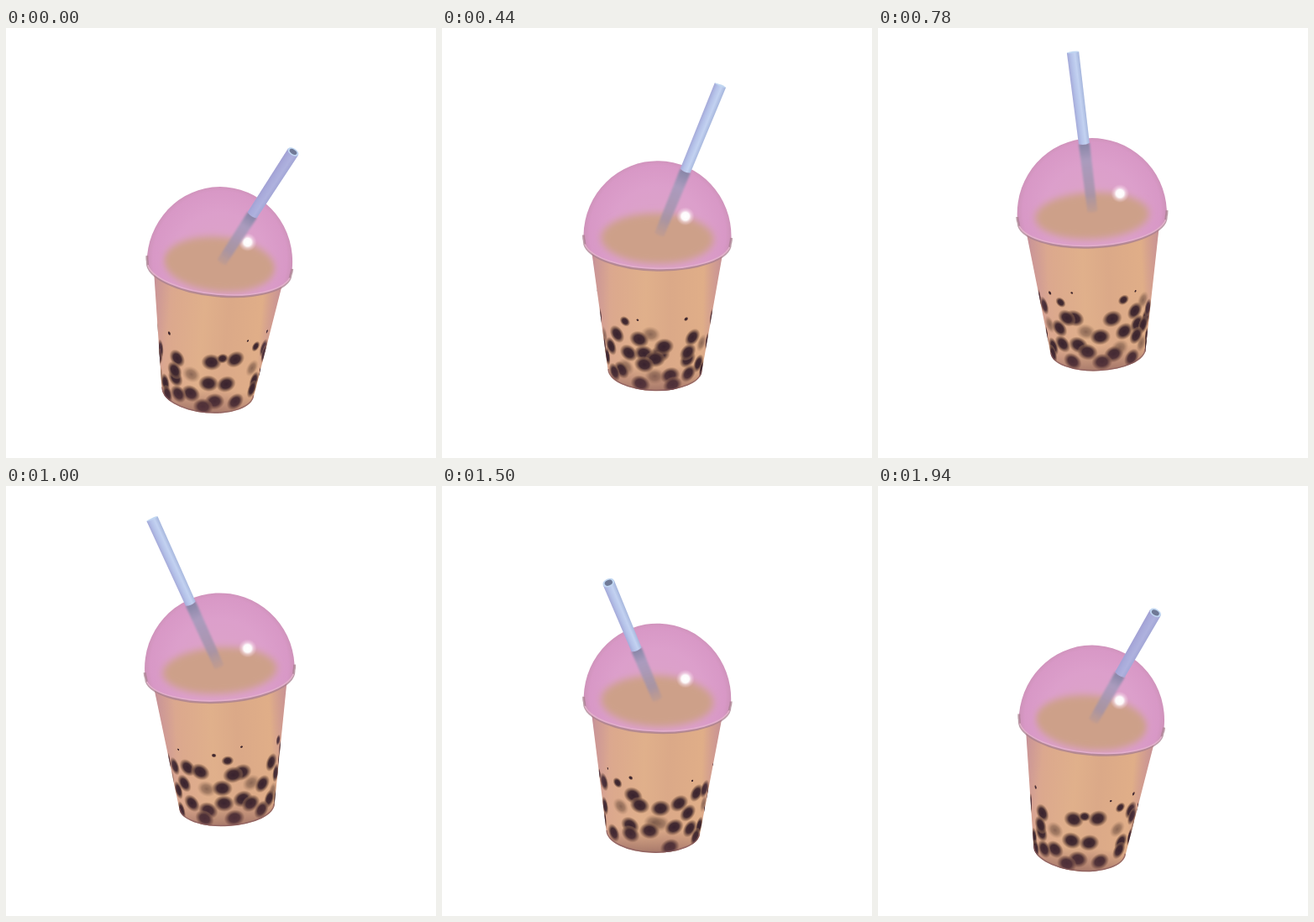
An HTML page for the animation above (2000 ms loop, 512 px wide and 512 px high).

```html
<!DOCTYPE html>
<html lang="en">
<head>
<meta charset="utf-8">
<title>Bubble tea</title>
<style>
html, body { margin: 0; width: 100%; height: 100%; overflow: hidden; background: #fff; }
svg { display: block; width: 100vw; height: 100vh; }
</style>
</head>
<body>
<svg viewBox="0 0 512 512">
  <defs>
    <linearGradient id="tea">
      <stop offset="0" stop-color="#c4919a"/>
      <stop offset=".05" stop-color="#d8a394"/>
      <stop offset=".2" stop-color="#dca98d"/>
      <stop offset=".42" stop-color="#e0b08b"/>
      <stop offset=".6" stop-color="#dba988"/>
      <stop offset=".85" stop-color="#e0ae88"/>
      <stop offset=".96" stop-color="#d8a28f"/>
      <stop offset="1" stop-color="#c4919c"/>
    </linearGradient>
    <linearGradient id="sides">
      <stop offset="0" stop-color="#b5809a" stop-opacity=".5"/>
      <stop offset=".16" stop-color="#b5809a" stop-opacity="0"/>
      <stop offset=".84" stop-color="#b5809a" stop-opacity="0"/>
      <stop offset="1" stop-color="#b5809a" stop-opacity=".5"/>
    </linearGradient>
    <linearGradient id="floor" x2="0" y2="1">
      <stop offset=".84" stop-color="#7a4a50" stop-opacity="0"/>
      <stop offset="1" stop-color="#6e4248" stop-opacity=".5"/>
    </linearGradient>
    <radialGradient id="lid" gradientUnits="userSpaceOnUse" cx="0" cy="-4" r="92">
      <stop offset="0" stop-color="#dca4c8"/>
      <stop offset=".6" stop-color="#dc9fcb"/>
      <stop offset=".88" stop-color="#d898c6"/>
      <stop offset=".96" stop-color="#cd92b8"/>
      <stop offset="1" stop-color="#c08ba8"/>
    </radialGradient>
    <radialGradient id="dark">
      <stop offset="0" stop-color="#38222e"/>
      <stop offset=".5" stop-color="#40282f" stop-opacity=".97"/>
      <stop offset=".68" stop-color="#66473f" stop-opacity=".78"/>
      <stop offset=".85" stop-color="#8c6650" stop-opacity=".5"/>
      <stop offset="1" stop-color="#a67b60" stop-opacity="0"/>
    </radialGradient>
    <radialGradient id="deep">
      <stop offset="0" stop-color="#6e4e42" stop-opacity=".75"/>
      <stop offset=".5" stop-color="#83604d" stop-opacity=".62"/>
      <stop offset="1" stop-color="#a67b60" stop-opacity="0"/>
    </radialGradient>
    <radialGradient id="glint">
      <stop offset="0" stop-color="#fff"/>
      <stop offset=".42" stop-color="#fff" stop-opacity=".95"/>
      <stop offset=".65" stop-color="#fff0f8" stop-opacity=".45"/>
      <stop offset="1" stop-color="#fbdcec" stop-opacity="0"/>
    </radialGradient>
    <linearGradient id="tube">
      <stop offset="0" stop-color="#a4a8d8"/>
      <stop offset=".3" stop-color="#b4c1e8"/>
      <stop offset=".65" stop-color="#c3d2f1"/>
      <stop offset="1" stop-color="#a5b5dc"/>
    </linearGradient>
    <linearGradient id="sunk" x1="0" y1="1" x2="0" y2="0">
      <stop offset="0" stop-color="#a5929f" stop-opacity=".25"/>
      <stop offset=".25" stop-color="#a091a8" stop-opacity=".8"/>
      <stop offset=".75" stop-color="#a59bbc" stop-opacity=".9"/>
      <stop offset="1" stop-color="#8685a6"/>
    </linearGradient>
    <filter id="soft" x="-20%" y="-30%" width="140%" height="160%"><feGaussianBlur stdDeviation="4"/></filter>
    <filter id="haze" x="-30%" y="-10%" width="160%" height="120%"><feGaussianBlur stdDeviation="1.1"/></filter>
    <clipPath id="inside"><path class="wall"/></clipPath>
    <clipPath id="under"><path class="cap"/></clipPath>
  </defs>

  <g id="cup">
    <path class="wall" fill="url(#tea)"/>
    <g clip-path="url(#inside)">
      <g id="pearls"></g>
      <path class="wall" fill="url(#floor)"/>
      <path class="wall" fill="url(#sides)"/>
      <path id="base" fill="none" stroke="#875a60" stroke-width="3" opacity=".7"/>
    </g>
    <path class="cap" fill="url(#lid)"/>
    <g clip-path="url(#under)">
      <ellipse id="surface" fill="#cda089" filter="url(#soft)"/>
    </g>
    <path d="M-88 0Q-88 4 -87 7A87 33 0 0 0 87 7Q88 4 88 0" fill="none" stroke="#a97f8f" stroke-width="3" opacity=".75"/>
    <path d="M-86 11A87 32 0 0 0 86 11" fill="none" stroke="#e3b0cc" stroke-width="1.6"/>
  </g>
  <circle id="spark" r="11" fill="url(#glint)"/>
  <g id="straw">
    <path id="lower" fill="url(#sunk)" filter="url(#haze)"/>
    <path class="upper" fill="url(#tube)"/>
    <path class="upper" id="shade" fill="#a29cd2"/>
    <ellipse id="lip" rx="7.2" fill="#c0d6f1"/>
    <ellipse id="hole" rx="4.8" fill="#6f7996"/>
  </g>
</svg>
<script>
const FPS = 18, STEPS = 36, RAD = Math.PI / 180;
const $ = id => document.getElementById(id);
const set = (el, attrs) => { for (const k in attrs) el.setAttribute(k, attrs[k]); };
const setAll = (cls, d) => document.querySelectorAll(cls).forEach(el => set(el, { d }));

// Pearls as [angle around the cup, height from floor to rim]
const groups = [
  { r: 12, fill: 'deep', at: [[52, .33], [-85, .46], [-80, .12], [-152, .31], [159, .29], [97, .24], [90, .25], [-115, .16], [-20, .3]] },
  { r: 12.5, fill: 'dark', at: [
    [-38, .39], [1, .43], [26, .45], [-41, .22], [-42, .28], [-20, .14], [0, .25], [20, .245], [9, .1], [-37, .1],
    [-4, .05], [36, .08], [63, .2], [-75, .3], [68, .45], [-62, .12], [-97, .41], [-71, .36], [-110, .28], [-92, .3],
    [-80, .26], [-92, .21], [-97, .05], [-124, .4], [-122, .12], [-137, .27], [-58, .04], [-163, .41], [-172, .4], [-184, .3],
    [-183, .18], [-162, .2], [-152, .15], [-136, .07], [-172, .06], [117, .39], [139, .43], [154, .42], [130, .29], [114, .2],
    [137, .15], [158, .12], [97, .365], [75, .38], [63, .13], [86, .18], [111, .04], [152, .05]] },
  { r: 7.5, fill: 'dark', at: [[12, .465], [50, .515], [-112, .53], [-177, .515]] },
  { r: 3.2, fill: 'dark', at: [[-49, .56], [66, .59], [-190, .56]] },
  { r: 2, fill: 'dark', at: [[37, .59], [-98, .565], [-163, .61], [130, .55]] }
];

const pearls = groups.flatMap(({ r, fill, at }) => at.map(([angle, height]) => {
  const el = document.createElementNS('http://www.w3.org/2000/svg', 'circle');
  set(el, { r: 1, fill: `url(#${fill})` });
  $('pearls').append(el);
  return { el, r, angle, height };
}));

function drawCup(turn, bob, cx, cy, tilt) {
  const scale = 1 - .015 * bob;
  const depth = 159 - 5 * bob, floorRy = 25 + bob;
  set($('cup'), { transform: `translate(${cx} ${cy}) rotate(${tilt}) scale(${scale} 1)` });
  const bottom = `A56 ${floorRy} 0 0 0 56 ${depth}`;
  setAll('.wall', `M-81 0L-56 ${depth}${bottom}L81 0Z`);
  setAll('.cap', 'M-88 0A88 90 0 0 1 88 0Q88 4 87 7A87 33 0 0 1 -87 7Q-88 4 -88 0Z');
  set($('base'), { d: `M-56 ${depth}${bottom}` });
  set($('surface'), { cx: 0, cy: 2.5, rx: 67, ry: 30 + 2.5 * bob });

  for (const { el, r, angle, height } of pearls) {
    const a = (angle + turn) * RAD, c = Math.cos(a), s = Math.sin(a);
    const x = (56 + 25 * height) * s;
    const y = depth * (1 - height) + (floorRy + 13 * height) * c;
    set(el, {
      transform: `matrix(${Math.max(c, .05) * r} ${-.45 * s * r} 0 ${.8 * r} ${x} ${y})`,
      visibility: c > .03 ? 'visible' : 'hidden'
    });
  }
}

function drawStraw(turn, bob, cx, cy, tilt) {
  const a = (turn + 54.6) * RAD, s = Math.sin(a), c = Math.cos(a);
  const x0 = cx + 1 + 3 * s, y0 = cy - 3 + 2 * c;
  const x1 = 258 + 103 * s;
  const y1 = cy - 161 + 29 * c + 5 * bob + 103 * s * Math.tan(tilt * RAD);
  const length = Math.hypot(x1 - x0, y1 - y0), exit = length * .42;
  const lean = Math.atan2(x1 - x0, y0 - y1) / RAD;
  const open = Math.max(1, 2.3 + 3.2 * c);

  set($('straw'), { transform: `translate(${x0} ${y0}) rotate(${lean})` });
  set($('lower'), { d: `M-6 2L-6.6 ${-exit}H6.6L6 2Q0 5 -6 2Z` });
  setAll('.upper', `M-6.5 ${-exit}L-7.2 ${-length}H7.2L6.5 ${-exit}Q0 ${3 - exit} -6.5 ${-exit}Z`);
  set($('shade'), { opacity: .6 * Math.max(0, Math.cos(a - 50 * RAD)) ** 2 });
  set($('lip'), { cy: -length, ry: open });
  set($('hole'), { cy: -length, ry: open * .65, opacity: Math.min(1, Math.max(0, (open - 1) / 2)) });
}

function draw(ms) {
  const step = Math.floor((ms % 2000 + 5) * FPS / 1000) % STEPS;
  const turn = step * 360 / STEPS;
  const bob = Math.cos((turn + 10) * RAD);
  const cx = 256.5 - 2.2 * bob * bob, cy = 248.2 + 31.3 * bob, tilt = 1.1 + 4.2 * bob;
  drawCup(turn, bob, cx, cy, tilt);
  set($('spark'), { cx: cx + 33.3, cy: cy - 24 });
  drawStraw(turn, bob, cx, cy, tilt);
}

const start = performance.now();
function tick() {
  draw(performance.now() - start);
  requestAnimationFrame(tick);
}
tick();
</script>
</body>
</html>
```
